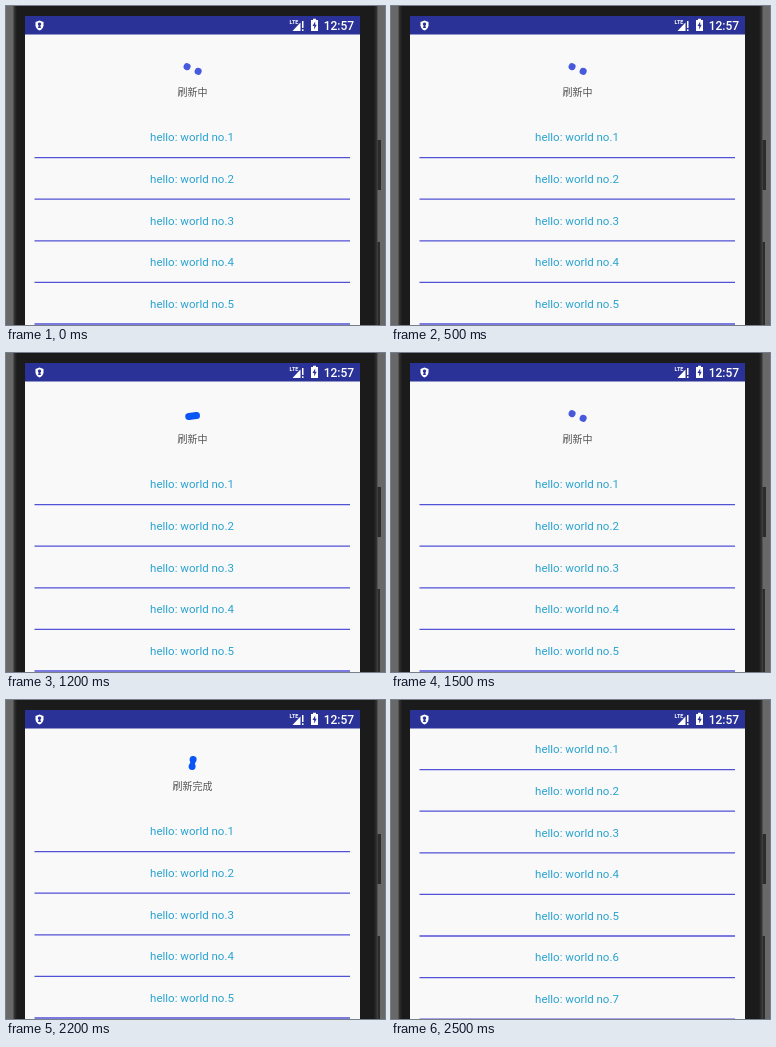
An HTML page that plays this animation: 379x319 px, repeating every 2.6 s.

```html
<!DOCTYPE html>
<html lang="zh">
<head>
<meta charset="utf-8">
<style>
html, body { margin: 0; width: 100%; height: 100%; overflow: hidden; background: #686868; }
svg { display: block; width: 379px; height: 319px; }
text { font-family: Roboto, sans-serif; }
#list text { font-size: 11.5px; fill: #2aa3cf; text-anchor: middle; }
#list path { stroke: #5252d6; stroke-width: 1.3; }
#label { font: 10px "Noto Sans CJK SC", "Noto Sans CJK", sans-serif; fill: #555; text-anchor: middle; }
</style>
</head>
<body>
<svg viewBox="0 0 379 319">
  <defs>
    <clipPath id="screen"><path d="M19 28.5H354V319H19z"/></clipPath>
    <linearGradient id="case">
      <stop offset="0" stop-color="#3a3a3a"/>
      <stop offset=".01" stop-color="#1b1b1b"/>
      <stop offset=".99" stop-color="#1b1b1b"/>
      <stop offset="1" stop-color="#3a3a3a"/>
    </linearGradient>
  </defs>
  <path fill="#686868" d="M0 0H379V319H0z"/>
  <path fill="url(#case)" d="M7.5 0H371.5V319H7.5z"/>
  <path fill="#2c2c2c" d="M371.5 134H375V184H371.5zM371.5 236H374V319H371.5z"/>
  <path fill="#f9f9fa" d="M19 10H354V319H19z"/>

  <g clip-path="url(#screen)">
    <g id="header">
      <g id="dots">
        <path id="bridge"/>
        <circle r="3.5"/>
        <circle r="3.5"/>
      </g>
      <text id="label" x="186.5" y="89.7"></text>
    </g>
    <g id="list"></g>
  </g>

  <path fill="#2a3297" d="M19 10H354V28.5H19z"/>
  <g fill="#fff">
    <path d="M33.5 14.5L37.5 16V19.5Q37 23 33.5 24.5Q30 23 29.5 19.5V16z"/>
    <path fill="#2a3297" d="M33.5 16.5a1.7 1.7 0 0 1 .8 3.2L35 22H32L32.7 19.7a1.7 1.7 0 0 1 .8-3.2z"/>
    <text x="283.5" y="18" font-size="5.5" font-weight="700">LTE</text>
    <path d="M286.5 25L294.5 16.5V25z"/>
    <path d="M296 15H297.5V22H296zM296 23.3H297.5V25H296z"/>
    <path d="M305 14H307V12.8H310V14H312V25H305z"/>
    <path fill="#2a3297" d="M309.2 15.5L306.5 20H308.2V23.5L310.7 18.8H309.2z"/>
    <text x="317.7" y="23.6" font-size="12" font-weight="500">12:57</text>
  </g>
</svg>
<script>
const $ = id => document.getElementById(id);
const LOOP = 2600, STEP = 100, SPIN = 500, DONE = 2200;
const [dotA, dotB] = document.querySelectorAll('#dots circle');

$('list').innerHTML = Array.from({ length: 8 }, (_, i) => {
  const y = 131 + i * 41.6;
  return `<text x="186" y="${y + 4.3}">hello: world no.${i + 1}</text><path d="M28.5 ${y + 20.6}H344"/>`;
}).join('');

function drawDots(angle, gap, neck, color) {
  $('dots').setAttribute('transform', `translate(186.6 63) rotate(${angle})`);
  $('dots').setAttribute('fill', color);
  dotA.setAttribute('cx', -gap / 2);
  dotB.setAttribute('cx', gap / 2);
  $('bridge').setAttribute('d', `M${-gap / 2} ${-neck / 2}h${gap}v${neck}h${-gap}z`);
}

function render(time) {
  const t = Math.floor(time % LOOP / STEP) * STEP;
  const done = t >= DONE;
  const scroll = t >= 2500 ? -82 : t >= 2400 ? -28.5 : 0;

  if (done) {
    drawDots(98, 7, 5, '#0a55f5');
  } else {
    const turn = t % SPIN / SPIN, a = turn * 2 * Math.PI;
    const gap = 7.8 + 4.2 * Math.max(0, Math.cos(a) - .31) / .69;
    const apart = gap > 10;
    drawDots(23 + 360 * turn + 12 * Math.sin(a), gap, apart ? 0 : 7, apart ? '#4759dd' : '#0a55f5');
  }

  $('label').textContent = done ? '刷新完成' : '刷新中';
  $('list').setAttribute('transform', `translate(0 ${scroll})`);
  $('header').setAttribute('transform',
    scroll ? 'translate(186.5 35.5) scale(.83) translate(-186.5 -63)' : '');
  $('header').setAttribute('visibility', t >= 2500 ? 'hidden' : 'visible');
}

const start = performance.now();
(function tick() {
  render(performance.now() - start);
  requestAnimationFrame(tick);
})();
</script>
</body>
</html>
```
